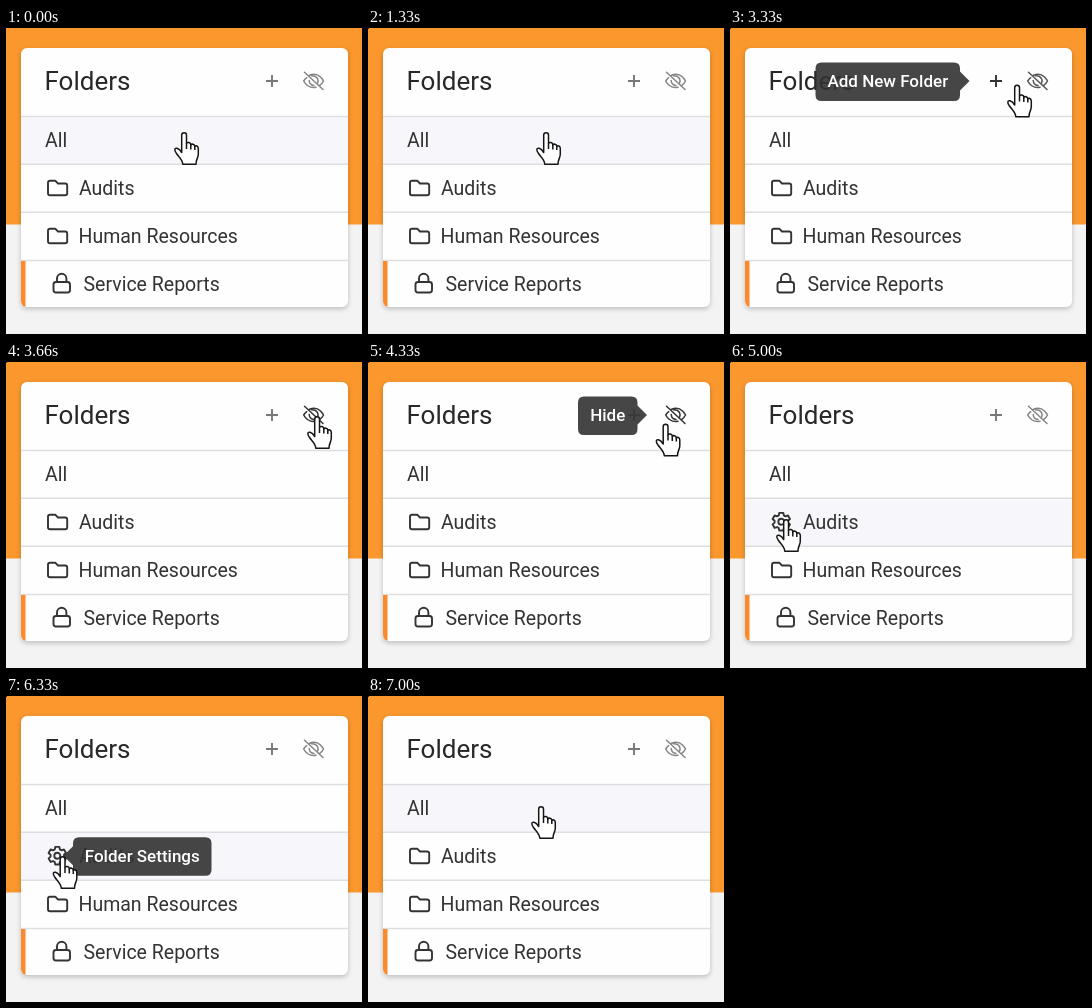
Write an HTML page that moves like this. It is 356x306 px and loops after 8.33 s.

```html
<!DOCTYPE html>
<html lang="en">
<head>
<meta charset="utf-8">
<title>Folders</title>
<style>
  html, body { margin: 0; width: 100%; height: 100%; overflow: hidden; background: #f3f3f4; }
  svg { display: block; width: 356px; height: 306px; font: 19.5px Roboto, sans-serif; fill: #333; }
  .card { filter: drop-shadow(0 2px 2.5px rgba(0, 0, 0, .22)); }
  .title { font-size: 26px; fill: #282828; }
  .icon { fill: none; stroke: #333; stroke-width: 1.9; stroke-linejoin: round; stroke-linecap: round; }
  .line { stroke: #dedee0; stroke-width: 1.4; }
  .tip text { font-size: 17px; font-weight: 500; fill: #fff; }
  .tip path { fill: rgba(50, 50, 50, .9); }
  .cursor { fill: #fff; stroke: #151515; stroke-width: 1.5; stroke-linejoin: round; }
</style>
</head>
<body>
<svg viewBox="0 0 356 306">
  <defs>
    <clipPath id="cardShape"><rect x="15" y="20" width="327" height="259" rx="6"/></clipPath>
    <path id="folderIcon" d="M44 152.7h5.2l2.8 2.8h7.2q2 0 2 2v7.8q0 2-2 2H44q-2 0-2-2V154.700q0-2 2-2z"/>
  </defs>
  <rect width="356" height="306" fill="#f3f3f4"/>
  <rect width="356" height="196.500" fill="#fa982e"/>
  <rect id="dot" width="1" height="1" fill="#222"/>

  <rect class="card" x="15" y="20" width="327" height="259" rx="6" fill="#fefefe"/>
  <g clip-path="url(#cardShape)">
    <rect id="hover" x="15" width="327" height="48" fill="#f7f7fb"/>
    <path class="line" d="M15 88.500H342M15 136.300H342M15 184.300H342M15 232.500H342"/>
    <rect x="15" y="233" width="4.500" height="46" fill="#fa8a2c"/>
  </g>

  <text class="title" x="38.500" y="62">Folders</text>
  <text x="39" y="119">All</text>
  <text x="73" y="167">Audits</text>
  <text x="72.500" y="215">Human Resources</text>
  <text x="77.500" y="263">Service Reports</text>

  <g class="icon">
    <path id="plus" d="M266 47v12M260 53h12" stroke-linecap="butt"/>
    <g id="eye" stroke-width="1.500">
      <path d="M298.500 44.200L317 61.500M303.500 47.300Q310 44.800 314.500 49Q316.500 51 317.500 53Q316 56 313.500 57.700M300.700 49.700Q298.800 51.200 297.700 53Q301.500 60.500 310 59.300M305.500 47.700Q309.500 47.500 311.500 50.500Q312.400 52.400 311.700 54.800M303.200 52.500Q303.500 57 308 57.500"/>
    </g>
    <use id="folder" href="#folderIcon"/>
    <path id="gear"/>
    <use href="#folderIcon" y="48"/>
    <path d="M50 254h11.500q2.500 0 2.500 2.500v5.500q0 2.500-2.500 2.500H50q-2.500 0-2.500-2.500v-5.500q0-2.500 2.500-2.500zM51 254v-3.500a4.700 4.700 0 0 1 9.400 0v3.500"/>
  </g>

  <g id="tips"></g>

  <g id="hand" class="cursor">
    <path d="M7.700 3.200C7.700 0 12.500 0 12.500 3.200V11.500C13.200 9.800 16.800 10.200 16.800 13C17.500 11.500 20.800 12 20.800 14.500C21.800 13.200 24.300 13.800 24.300 16.500V22C24.300 26 22 27 22 32.200H8.800C8.800 28 5 25 2.500 21.500C-.3 18 .8 15.700 3 16.300C5 16.900 6.500 18.500 7.700 20.500Z"/>
    <path d="M12.500 11.500V17M16.800 13V17.500M20.800 14.500V18" fill="none"/>
  </g>
  <path id="arrow" class="cursor" d="M.7 1V24.500L6 19.500L9.500 27.300L13 25.800L9.700 18H17Z"/>
</svg>

<script>
const LOOP = 8330;
const $ = id => document.getElementById(id);

// Six-toothed outline around the icon centre
function gearPath(cx, cy) {
  const points = [];
  for (let tooth = 0; tooth < 6; tooth++)
    for (const [angle, radius] of [[-22, 6.8], [-13, 9.1], [13, 9.1], [22, 6.8]]) {
      const a = (tooth * 60 - 90 + angle) * Math.PI / 180;
      points.push((cx + radius * Math.cos(a)).toFixed(2) + ' ' + (cy + radius * Math.sin(a)).toFixed(2));
    }
  return `M${points.join('L')}ZM${cx - 3} ${cy}a3 3 0 1 0 6 0a3 3 0 1 0-6 0`;
}
$('gear').setAttribute('d', gearPath(51.3, 159.7));

// side: 1 points right, -1 points left
function addTip(id, label, x, y, width, side) {
  const edge = side > 0 ? x + width : x;
  $('tips').insertAdjacentHTML('beforeend', `<g class="tip" id="${id}">
    <path d="M${x + 6} ${y}h${width - 12}q6 0 6 6v26.500q0 6-6 6h${12 - width}q-6 0-6-6v-26.500q0-6 6-6z
      M${edge} ${y + 9}l${side * 9.5} 9.500l${-side * 9.5} 9.500z"/>
    <text x="${x + width / 2}" y="${y + 24.5}" text-anchor="middle">${label}</text></g>`);
}
addTip('addTip', 'Add New Folder', 85.5, 34.5, 144.5, 1);
addTip('hideTip', 'Hide', 210, 34.5, 59.5, 1);
addTip('settingsTip', 'Folder Settings', 67, 141.300, 138.500, -1);

const ALL = 88.500, AUDITS = 136.500;
const rest = { cursor: 'hand', row: null, tip: null, tipOpacity: 1, plus: '#777', eye: '#858585', gear: false };
const steps = [
  { at: 0, x: 168, y: 104, row: ALL },
  { at: 1660, x: 179, y: 103, row: ALL },
  { at: 2000, x: 256, y: 66, cursor: 'arrow' },
  { at: 2330, x: 251, y: 57, plus: '#222' },
  { at: 2660, x: 251, y: 57, plus: '#222', tip: 'addTip' },
  { at: 3330, x: 277, y: 56.500, plus: '#333', eye: '#555', tip: 'addTip' },
  { at: 3660, x: 301, y: 54, eye: '#333' },
  { at: 4000, x: 301, y: 54, eye: '#333', tip: 'hideTip' },
  { at: 4330, x: 287.500, y: 61.500, eye: '#333', tip: 'hideTip' },
  { at: 4660, x: 40, y: 131, row: ALL },
  { at: 5000, x: 46, y: 157, row: AUDITS, gear: true },
  { at: 5330, x: 46.500, y: 160, row: AUDITS, gear: true, tip: 'settingsTip', tipOpacity: .12 },
  { at: 5660, x: 46.500, y: 160, row: AUDITS, gear: true, tip: 'settingsTip' },
  { at: 6660, x: 150, y: 105, row: ALL },
  { at: 7000, x: 163, y: 110, row: ALL }
];

const show = (id, visible) => { $(id).style.display = visible ? '' : 'none'; };

function draw(now) {
  const t = now % LOOP;
  const s = { ...rest, ...steps.findLast(step => step.at <= t) };
  show('dot', t >= 660);
  show('hover', s.row !== null);
  if (s.row !== null) $('hover').setAttribute('y', s.row);
  show('gear', s.gear);
  show('folder', !s.gear);
  $('plus').style.stroke = s.plus;
  $('eye').style.stroke = s.eye;
  for (const tip of $('tips').children) {
    show(tip.id, tip.id === s.tip);
    tip.style.opacity = s.tipOpacity;
  }
  for (const kind of ['hand', 'arrow']) show(kind, kind === s.cursor);
  $(s.cursor).setAttribute('transform', `translate(${s.x} ${s.y})`);
}

const start = performance.now();
function tick() {
  draw(performance.now() - start);
  requestAnimationFrame(tick);
}
tick();
</script>
</body>
</html>
```
